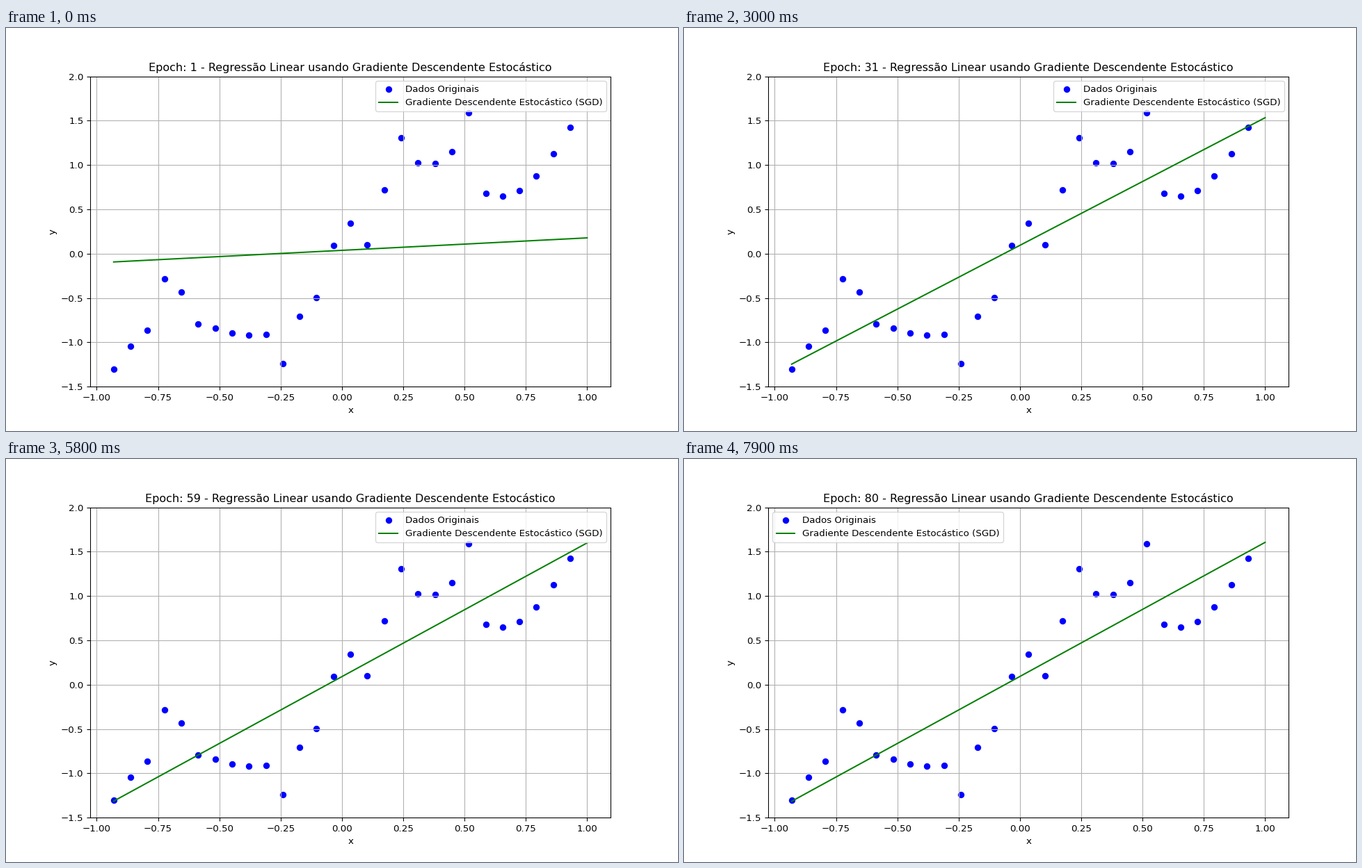
Recreate the animation shown at these times as a matplotlib script. Size 966 by 580 pixels, loop 8000 ms.

```python
import numpy as np
import matplotlib.pyplot as plt
from matplotlib.animation import FuncAnimation

EPOCHS = 80
LEGEND_EDGE = 1.6005  # a higher line end would run into the legend
OUTLIERS = {3: 0.49, 4: 0.33, 10: -0.4, 13: 0.31, 14: 0.24,
            15: -0.33, 17: 0.38, 20: 0.23, 21: 0.8, 28: 0.57}


def samples():
    """Rising wave with a few outliers."""
    x = np.linspace(-1, 1, 30)[1:]
    y = 1.68 * x + 0.48 * np.sin(2 * np.pi * x) - 0.06 * np.cos(10 * x)
    for i, offset in OUTLIERS.items():
        y[i] += offset
    return x, y


def fit(epoch):
    """Slope and intercept, settling exponentially with a slight wobble."""
    gap = 1.513 * np.exp(-0.0975 * epoch)
    wobble = 0.003 * np.cos(2 * np.pi * epoch / 5)
    bias = 0.09 + 0.045 * gap - 0.16 * np.exp(-0.33 * epoch)
    return 1.513 - gap, bias + wobble


x, y = samples()
fig, ax = plt.subplots(figsize=(10.0625, 6.0417), dpi=96)
ax.scatter(x, y, color="blue", label="Dados Originais")
line, = ax.plot(x, 0 * x, color="green",
                label="Gradiente Descendente Estocástico (SGD)")
pad = 0.05 * np.ptp(x)
ax.set(xlim=(x[0] - pad, x[-1] + pad), ylim=(-1.5, 2), xlabel="x", ylabel="y")
ax.grid(True)
legend = ax.legend(loc="upper right")


def update(i):
    epoch = i + 1
    slope, bias = fit(epoch)
    line.set_ydata(slope * x + bias)
    blocked = slope + bias > LEGEND_EDGE
    legend.set_loc("upper left" if blocked else "upper right")
    ax.set_title(f"Epoch: {epoch} - Regressão Linear usando "
                 "Gradiente Descendente Estocástico")
    return line,


anim = FuncAnimation(fig, update, frames=EPOCHS, interval=100, repeat=True)
plt.show()
```
